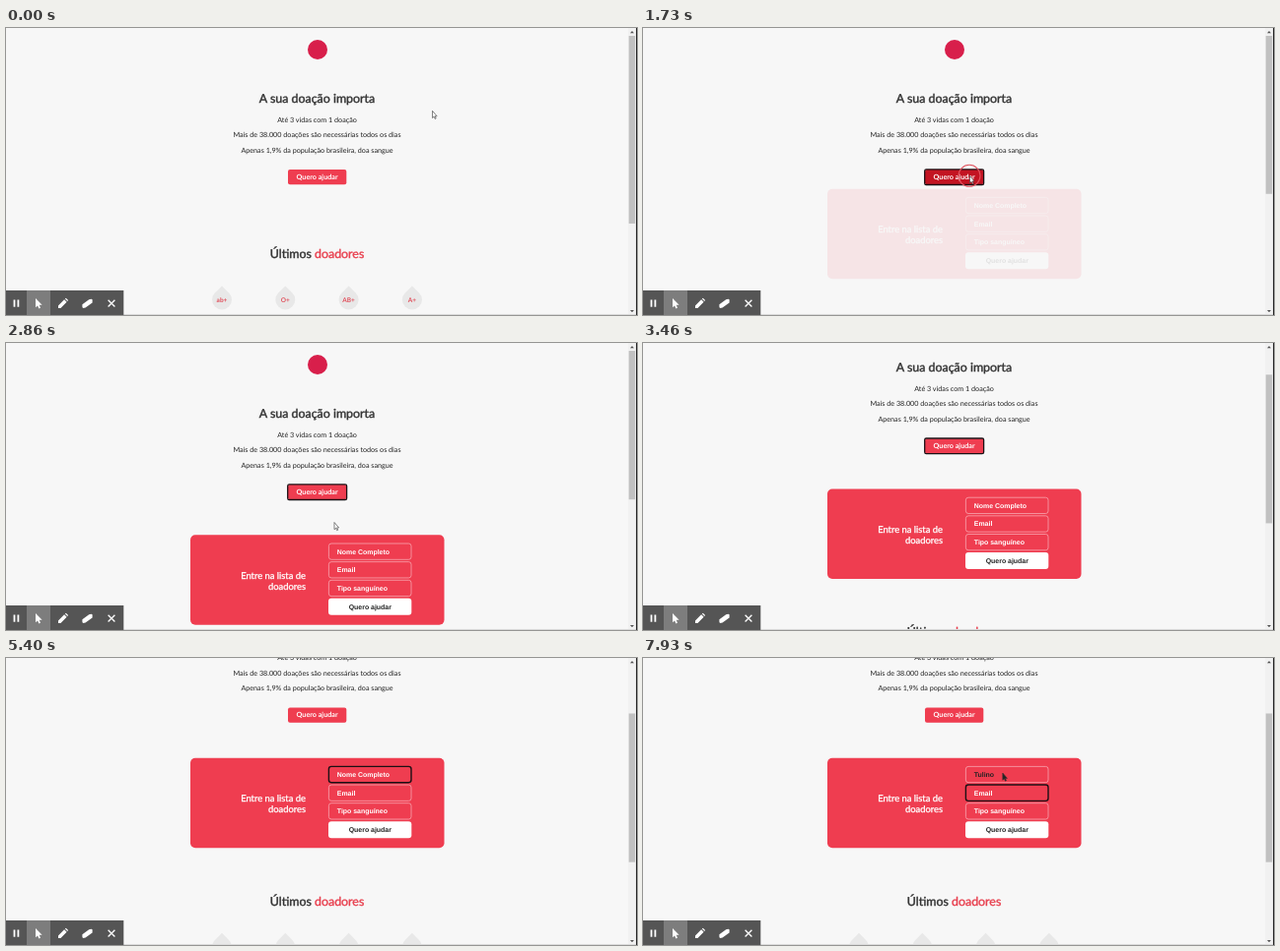
An HTML page for the animation above (8000 ms loop, 640 px wide and 292 px high).

```html
<!DOCTYPE html>
<html lang="pt-BR">
<head>
<meta charset="utf-8">
<title>Doação de sangue</title>
<style>
  html, body { margin: 0; width: 100%; height: 100%; overflow: hidden; background: #f7f7f7; }
  svg { display: block; width: 100%; height: 100%; }
  text { font: 7.2px Lato, "Open Sans", sans-serif; fill: #222; text-rendering: geometricPrecision; }
  .mid { text-anchor: middle; }
  .title { font-size: 12.4px; fill: #333; stroke: #333; stroke-width: .42px; }
  .title .hot { fill: #e8404f; stroke: #e8404f; }
  .call { font-size: 9.4px; fill: #fff; stroke: #fff; stroke-width: .32px; text-anchor: end; }
  .bold { font-weight: 700; }
  .type { font-size: 6.5px; font-weight: 700; fill: #e0505c; }
  .ui { font: 700 6.95px "Liberation Sans", Arial, sans-serif; }
  .white { fill: #fff; }
</style>
</head>
<body>
<svg viewBox="0 0 640 292" preserveAspectRatio="none">
  <rect width="640" height="292" fill="#f7f7f7"/>
  <g id="page">
    <circle cx="316" cy="22" r="10" fill="#d81f4b"/>
    <text class="title mid" x="315.5" y="76">A sua doação importa</text>
    <text class="mid" x="315.5" y="95.8">Até 3 vidas com 1 doação</text>
    <text class="mid" x="315.5" y="111.3">Mais de 38.000 doações são necessárias todos os dias</text>
    <text class="mid" x="315.5" y="127.1">Apenas 1,9% da população brasileira, doa sangue</text>
    <rect id="help" x="286" y="144" width="59.3" height="15.3" rx="2"/>
    <rect id="helpFocus" x="285.7" y="143.8" width="59.9" height="15.7" rx="1.6" fill="none" stroke="#1c1014" stroke-width="1.3"/>
    <text class="mid bold white" x="315.6" y="154">Quero ajudar</text>

    <g id="form">
      <rect x="187" y="195.3" width="257.5" height="91.5" rx="5" fill="#ef3d50"/>
      <text class="call" x="304" y="239.6">Entre na lista de</text>
      <text class="call" x="304" y="250.9">doadores</text>
      <g id="fields"></g>
      <rect x="327" y="259.8" width="84.3" height="17" rx="3" fill="#fff"/>
      <text class="ui mid" x="369.3" y="270.6">Quero ajudar</text>
    </g>

    <g id="donors">
      <text class="title mid" x="315.5" y="234.3">Últimos <tspan class="hot">doadores</tspan></text>
    </g>
  </g>

  <circle id="ring" fill="none" stroke="#e0525e" stroke-width="1.1"/>
  <path id="cursor" d="M0 0V7.2L1.6 5.8L2.7 8.2L3.7 7.7L2.6 5.4H4.6Z" fill="#fff" stroke="#333" stroke-width=".6"/>

  <rect x="631" width="8" height="292" fill="#f1f1f1"/>
  <rect id="thumb" x="631.7" width="6.4" fill="#c1c1c1"/>
  <path d="M633 5.2H637L635 3ZM633 287H637L635 289.2Z" fill="#555"/>
  <rect x="639" width="1" height="292" fill="#2b2b2b"/>
  <rect y="291" width="639" height="1" fill="#dcdcdc"/>

  <rect y="267" width="119.3" height="25" fill="#555"/>
  <rect x="21" y="267" width="24" height="25" fill="#7d7d7d"/>
  <g fill="#fff">
    <path d="M7.6 276.5h1.8v7.2h-1.8zM11.5 276.5h1.8v7.2h-1.8z"/>
    <path d="M30 275V284.2L32.1 282.4L33.4 285.4L35 284.7L33.7 281.8H36.6Z"/>
    <path d="M53 285V282.4L59.1 276.3L61.6 278.8L55.5 285ZM59.9 275.6L60.8 274.8L63.1 277.1L62.3 278Z"/>
    <path d="M77.4 281.2L84.2 276.3Q87.3 275.3 87.6 276.5V279.4L80.6 284.6Q77.2 285.6 77.4 283.8Z"/>
  </g>
  <path d="M103.6 276.7L110.4 283.5M110.4 276.7L103.6 283.5" stroke="#fff" stroke-width="1.3"/>
</svg>
<script>
const LOOP = 8000;
const NAME = 'Tulino';
const LABELS = ['Nome Completo', 'Email', 'Tipo sanguíneo'];
const TYPES = ['ab+', 'O+', 'AB+', 'A+'];
const T = { press: 1560, open: 1616, scroll1: 3100, scroll2: 3590, focusName: 4480, type: 5830, focusMail: 7150, back: 7450 };

const $ = id => document.getElementById(id);
const set = (el, attrs) => { for (const k in attrs) el.setAttribute(k, attrs[k]); };
const add = (parent, tag, attrs, text = '') => {
  const el = document.createElementNS('http://www.w3.org/2000/svg', tag);
  set(el, attrs);
  el.textContent = text;
  return parent.appendChild(el);
};
const ramp = (t, start, length) => {
  const p = Math.min(1, Math.max(0, (t - start) / length));
  return p * p * (3 - 2 * p);
};
const mix = (a, b, p) => a + (b - a) * p;
const show = (el, on) => set(el, { visibility: on ? 'visible' : 'hidden' });

const fields = LABELS.map((label, i) => {
  const y = 204 + i * 18.65;
  return {
    box: add($('fields'), 'rect', { x: 327.4, y, width: 83.6, height: 16.3, rx: 2.6, fill: 'none' }),
    text: add($('fields'), 'text', { class: 'ui white', x: 335.8, y: y + 10.6 }, label)
  };
});

TYPES.forEach((type, i) => {
  const x = 219 + i * 64.3;
  add($('donors'), 'path', { d: `M${x} 262.4l7.1 7.1a10 10 0 1 1 -14.2 0z`, fill: '#e8e8e8' });
  add($('donors'), 'text', { class: 'type mid', x, y: 278.8 }, type);
});

function pointer(t) {
  if (t >= T.back) return [364.8, 117];
  const go = ramp(t, 90, 1000), leave = ramp(t, 1950, 400);
  return [mix(mix(432.5, 331.5, go), 333, leave), mix(mix(84.3, 150.5, go), 182.5, leave)];
}

function drawRing(t) {
  const first = t < 3000;
  const age = t - (first ? T.press : T.focusName - 60);
  show($('ring'), age >= 0 && age < 320);
  set($('ring'), {
    cx: first ? 331 : 365, cy: first ? 150.3 : 118,
    r: mix(4, 11, ramp(age, 0, 170)), opacity: 1 - ramp(age, 200, 120)
  });
}

function drawFields(t) {
  const active = t < T.focusName ? -1 : t < T.focusMail ? 0 : 1;
  fields.forEach(({ box }, i) => set(box, {
    stroke: i === active ? '#1c1014' : '#f9b4bc',
    'stroke-width': i === active ? 1.4 : .7
  }));
  const count = Math.max(0, Math.min(NAME.length, Math.floor((t - T.type) / 145) + 1));
  fields[0].text.textContent = count ? NAME.slice(0, count) : LABELS[0];
  fields[0].text.style.fill = count ? '#222' : '#fff';
}

function draw(t) {
  const scroll = 46.8 * (ramp(t, T.scroll1, 220) + ramp(t, T.scroll2, 220));
  const open = t >= T.open;
  const shown = ramp(t, T.open, 600);
  const lift = -35 * (1 - shown);
  const push = open ? 111 + lift : 0;
  set($('page'), { transform: `translate(0 ${-scroll})` });
  set($('form'), { transform: `translate(0 ${lift})`, opacity: shown });
  set($('donors'), { transform: `translate(0 ${push})` });

  const height = 422 + push;
  set($('thumb'), { y: 8 + 276 * scroll / height, height: 276 * 292 / height });

  const dark = ramp(t, 880, 200) - ramp(t, 2020, 200);
  set($('help'), { fill: `rgb(${mix(239, 195, dark)},${mix(61, 20, dark)},${mix(80, 34, dark)})` });
  show($('helpFocus'), t >= T.press && t < T.focusName);

  drawFields(t);
  drawRing(t);
  show($('cursor'), t < T.scroll1 || t >= T.back);
  set($('cursor'), { transform: `translate(${pointer(t)})`, fill: t >= T.back ? '#222' : '#fff' });
}

const begin = performance.now();
function tick() {
  draw((performance.now() - begin) % LOOP);
  requestAnimationFrame(tick);
}
tick();
</script>
</body>
</html>
```
